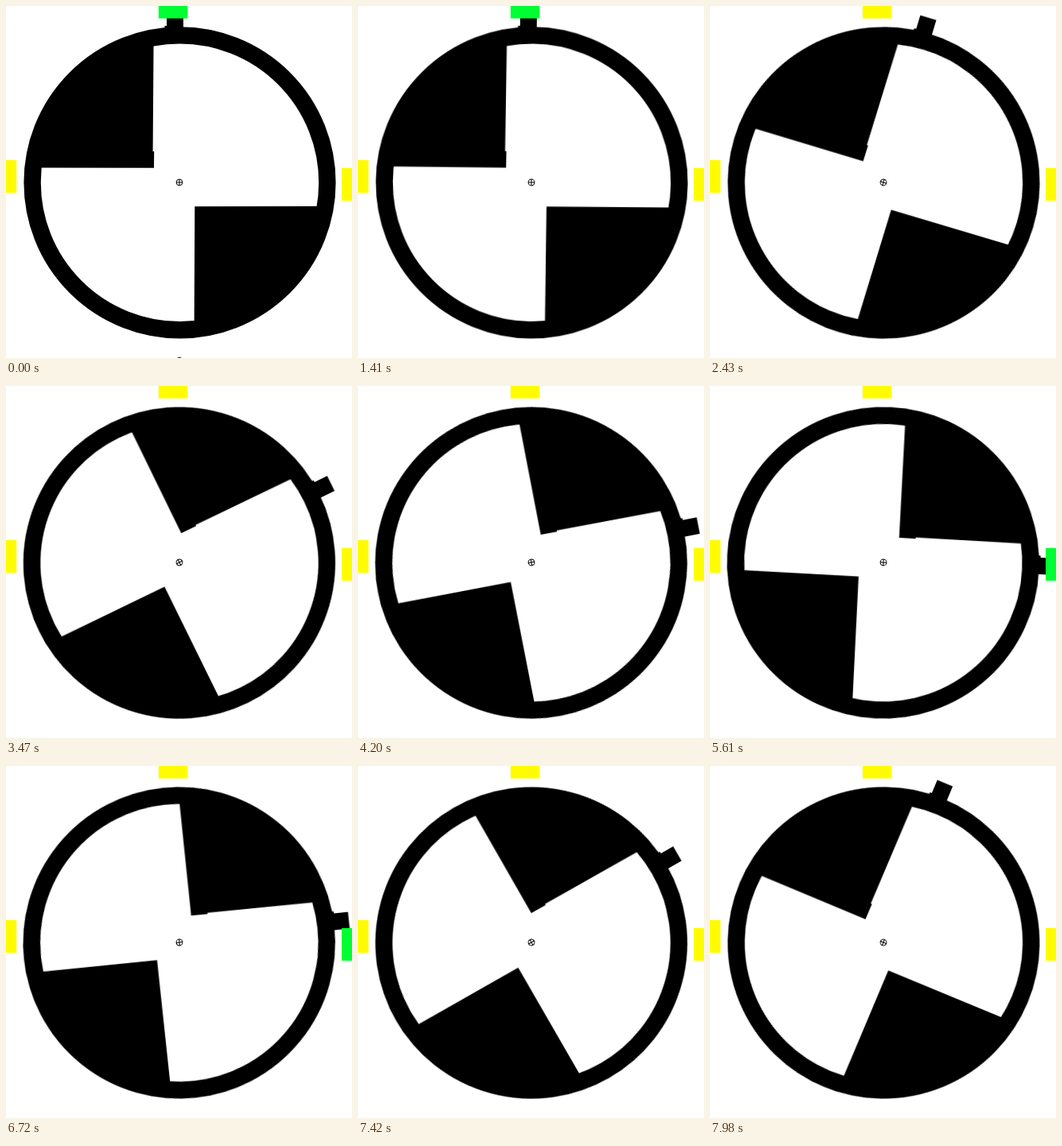
Recreate the animation shown at these times as an HTML page. Size 435 by 443 pixels, loop 8 s.

```html
<!DOCTYPE html>
<html lang="en">
<head>
<meta charset="utf-8">
<title>Rotating wheel with position sensors</title>
<style>
  html, body { margin: 0; width: 100%; height: 100%; overflow: hidden; background: #fff; }
  svg { display: block; width: 100%; height: 100%; }
  .soft { filter: blur(0.45px); }
  .sensor { fill: #fffc00; }
  .sensor.on { fill: #00ff32; }
  .mark { fill: none; stroke: #000; stroke-width: 1; }
</style>
</head>
<body>
<svg viewBox="0 0 435 443">
  <g id="wheel">
    <g class="soft">
      <circle cx="0.5" cy="0.3" r="185.4" fill="none" stroke="#000" stroke-width="21.4"/>
      <path d="M-32-18.3 L-31.8-39 H-33.4 L-32.4-182 A185 185 0 0 0 -183.5-18.5 Z"/>
      <path d="M19.3 30.3 L18.6 184 A185 185 0 0 0 182.5 30.1 Z"/>
      <path d="M-16-214.8 H5 V-190 H-18.5 V-197 H-16 Z"/>
    </g>
    <g class="mark">
      <circle r="3.9"/>
      <path d="M-4 0 H4 M0-4 V4"/>
    </g>
  </g>
  <circle id="lowMark" class="mark" cx="218" cy="446.3" r="3.9"/>
  <rect id="top" class="sensor" x="191.8" width="36.6" height="15.6"/>
  <rect class="sensor" y="194" width="13.2" height="41"/>
  <rect id="right" class="sensor" x="422" y="204" width="13" height="41"/>
</svg>
<script>
  const LOOP = 8000, START = 684, STEP = 79.28;
  const byId = id => document.getElementById(id);
  const wheel = byId('wheel'), topSensor = byId('top'), rightSensor = byId('right'), lowMark = byId('lowMark');

  // Key poses of the swing: [step, degrees]
  const poses = [[0, 0], [22, 16.7], [35, 63.9], [44, 79], [62, 92.9], [76, 84], [92, 22.6]];
  const last = poses.length - 1;

  // Mean speed from pose i to the next
  const rate = i => (poses[i + 1][1] - poses[i][1]) / (poses[i + 1][0] - poses[i][0]);

  // Speed at pose i: at rest first, then that of a parabola through its neighbours
  function speed(i) {
    if (i === 0) return 0;
    if (i === last) return 2 * rate(i - 1) - speed(i - 1);
    const before = poses[i][0] - poses[i - 1][0], after = poses[i + 1][0] - poses[i][0];
    return (rate(i - 1) * after + rate(i) * before) / (before + after);
  }

  function angleAt(step) {
    if (step <= 0) return 0;
    const i = Math.min(poses.findLastIndex(p => p[0] <= step), last - 1);
    const [s0, a0] = poses[i], [s1, a1] = poses[i + 1];
    const span = s1 - s0, u = (step - s0) / span, w = 1 - u;
    return w * w * ((1 + 2 * u) * a0 + u * span * speed(i))
         + u * u * ((3 - 2 * u) * a1 - w * span * speed(i + 1));
  }

  function draw(t) {
    const angle = angleAt(Math.floor((t - START) / STEP));
    wheel.setAttribute('transform', `translate(218 222) rotate(${angle})`);
    topSensor.classList.toggle('on', angle < 7.5);
    rightSensor.classList.toggle('on', angle > 83.7);
    lowMark.style.display = t < 300 ? '' : 'none';
  }

  const begin = performance.now();
  function tick() {
    draw((performance.now() - begin) % LOOP);
    requestAnimationFrame(tick);
  }
  tick();
</script>
</body>
</html>
```
